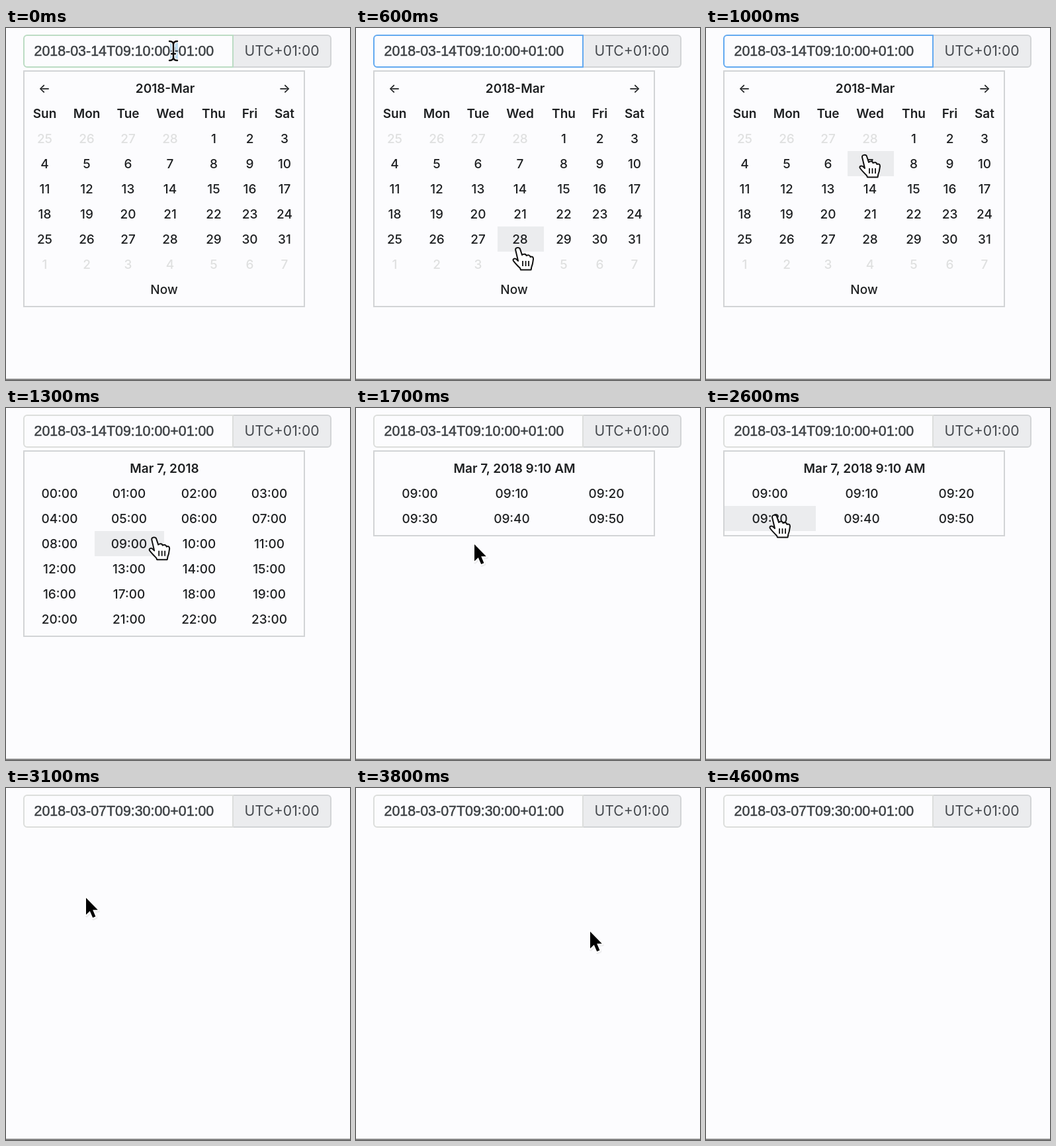
Animation of 520 by 532 pixels, one loop 4700 ms. Source, as an HTML page:

```html
<!DOCTYPE html>
<html lang="en">
<head>
<meta charset="utf-8">
<title>Date and time picker</title>
<style>
html, body { margin: 0; width: 100%; height: 100%; overflow: hidden; background: #fcfcfe; }
svg { display: block; width: 520px; height: 532px; font: 500 19px Inter, sans-serif; fill: #1e2022; cursor: default; }
text { white-space: pre; }
.mid { text-anchor: middle; }
.bold { font-weight: 600; }
.muted { fill: #dfe0e0; }
.value { font: 21.4px "Liberation Sans", Arial, sans-serif; fill: #3c4044; stroke: #3c4044; stroke-width: .5px; }
.zone { font-size: 21.2px; font-weight: 400; fill: #45494e; }
</style>
</head>
<body>
<svg id="stage" viewBox="0 0 520 532"></svg>
<script>
const LOOP = 4700, STEP = 100, ROW = 38, TOP = 72;
const HOURS_AT = 1200, MINUTES_AT = 1600, CLOSE_AT = 2900;
const FILL = "#ebecee", LINE = "#d2d4d6";
const stage = document.getElementById("stage");

// Pointer stops: time, x, y
const path = [
  [0, 253, 35], [100, 253, 35], [500, 246, 358], [900, 240, 192], [1200, 240, 192],
  [1500, 179, 206], [1900, 179, 206], [2500, 104, 162], [2900, 104, 162],
  [3100, 121, 166], [3700, 354, 217], [3800, 354, 217], [4200, 378, 545], [LOOP, 378, 545]
];

const pad = n => String(n).padStart(2, "0");
const text = (x, y, s, cls = "mid") => `<text x="${x}" y="${y}" class="${cls}">${s}</text>`;
const rect = (x, y, w, h, attrs) => `<rect x="${x}" y="${y}" width="${w}" height="${h}" ${attrs}/>`;
const baseline = row => TOP + row * ROW + 26.4;

function pointerAt(t) {
  const i = path.findIndex((p, k) => t >= p[0] && t < path[k + 1][0]);
  const [t0, x0, y0] = path[i], [t1, x1, y1] = path[i + 1];
  const u = (t - t0) / (t1 - t0), e = u * u * (3 - 2 * u);
  return [x0 + (x1 - x0) * e, y0 + (y1 - y0) * e];
}

// Column edges and text centres for each view
const layouts = {
  days: { edges: [28, 89, 155, 214, 284, 344, 392, 450], centers: [58.5, 122, 184.5, 248, 314, 368.5, 421] },
  hours: { edges: [28, 134, 239, 345, 450], centers: [81, 186, 292, 398] },
  minutes: { edges: [28, 166, 305, 450], centers: [96.5, 235.5, 378.5] }
};

function grid(view) {
  const cells = [];
  if (view === "days") {
    for (let i = 0; i < 42; i++) {
      const day = i - 3, muted = day < 1 || day > 31;
      cells.push([day < 1 ? day + 28 : day > 31 ? day - 31 : day, muted]);
    }
  } else if (view === "hours") {
    for (let h = 0; h < 24; h++) cells.push([pad(h) + ":00"]);
  } else {
    for (let m = 0; m < 60; m += 10) cells.push(["09:" + pad(m)]);
  }
  return cells;
}

function panel(view, px, py) {
  const { edges, centers } = layouts[view], cols = centers.length, days = view === "days";
  const cells = grid(view), first = days ? 2 : 1;
  const rows = first + cells.length / cols + (days ? 1 : 0);
  const row = Math.floor((py - TOP) / ROW);
  const col = edges.findIndex((x, i) => px >= x && px < edges[i + 1]);
  const hover = row >= first && row < rows && col >= 0;
  let out = rect(27, 65, 424, rows * ROW + 14, `fill="none" stroke="${LINE}" stroke-width="2"`);

  if (hover) {
    const now = days && row === rows - 1;
    const left = now ? 28 : edges[col], right = now ? 450 : edges[col + 1];
    out += rect(left, TOP + row * ROW, right - left, ROW, `fill="${FILL}"`);
  }

  const titles = { days: "2018-Mar", hours: "Mar 7, 2018", minutes: "Mar 7, 2018 9:10 AM" };
  out += text(days ? 240.5 : 239.5, baseline(0), titles[view], "mid bold");
  if (days) {
    out += text(58, baseline(0), "←") + text(421, baseline(0), "→");
    "Sun Mon Tue Wed Thu Fri Sat".split(" ").forEach((name, i) => {
      out += text(centers[i], baseline(1), name, "mid bold");
    });
    out += text(239, baseline(rows - 1), "Now");
  }
  cells.forEach(([label, muted], i) => {
    out += text(centers[i % cols], baseline(first + Math.floor(i / cols)), label, muted ? "mid muted" : "mid");
  });
  return { out, hover };
}

function field(t) {
  const border = t < 100 ? "#bcdcc4" : t < HOURS_AT ? "#64aaf0" : "#dcdedc";
  const date = t < CLOSE_AT ? "2018-03-14T09:10" : "2018-03-07T09:30";
  const line = color => `stroke="${color}" stroke-width="2"`;
  let out = `<path d="M343 11H486a5 5 0 0 1 5 5V54a5 5 0 0 1-5 5H343Z" fill="${FILL}" ${line(LINE)}/>`;
  out += `<path d="M343 11H32a5 5 0 0 0-5 5V54a5 5 0 0 0 5 5H343Z" fill="#fcfcfe" ${line(border)}/>`;
  if (t < 100) out += rect(248, 22, 12, 25, 'fill="#bcdcf0"');
  return out + text(42.5, 42, date + ":00+01:00", "value") + text(360.5, 42, "UTC+01:00", "zone");
}

const arrow = "M0 0V25.5L5.8 20L10.2 30L14.4 28.2L10.2 18.2H17.8Z";
const shapes = {
  beam: `<g fill="none" stroke-linecap="round">
    ${[["#fff", 5], ["#111", 2.4]].map(([c, w]) =>
      `<path d="M-6-15Q0-15 0-10Q0-15 6-15M0-10V9M-6 14Q0 14 0 9Q0 14 6 14M-3 4H3" stroke="${c}" stroke-width="${w}"/>`).join("")}</g>`,
  arrow: `<path d="${arrow}" transform="translate(1 2)" fill="#e8e8ea" stroke="#ececee" stroke-width="4" stroke-linejoin="round"/>
    <path d="${arrow}" fill="#000" stroke="#fff" stroke-width="4" stroke-linejoin="round" paint-order="stroke"/>`,
  hand: `<path d="M-4 3C-4-1 2-1 3 2L6 11C8 9 12 9 12.5 12C15 10.5 18 11 18.5 14C21 12.5 23 14 23 17L22 23C22 26 20 28 20 31L19.5 33.5H4L3 31C0 28-4 24-7 20C-9 17-5 15-2 18L0 20Z"
    fill="#fff" stroke="#111" stroke-width="2" stroke-linejoin="round"/>
    <path d="M7 20v8M11.5 20v8M16 20v8" fill="none" stroke="#111" stroke-width="1.8"/>`
};

function draw(t) {
  const [x, y] = pointerAt(t);
  const view = t < HOURS_AT ? "days" : t < MINUTES_AT ? "hours" : "minutes";
  const open = t < CLOSE_AT ? panel(view, x, y) : { out: "", hover: false };
  const shape = y < 60 ? "beam" : open.hover ? "hand" : "arrow";
  stage.innerHTML = field(t) + open.out + rect(0, 530, 520, 2, 'fill="#8a8a8a"') +
    `<g transform="translate(${x} ${y})">${shapes[shape]}</g>`;
}

let shown = -1;
const start = performance.now();
function tick() {
  const t = Math.floor(((performance.now() - start) % LOOP) / STEP) * STEP;
  if (t !== shown) draw(shown = t);
  requestAnimationFrame(tick);
}
tick();
</script>
</body>
</html>
```
